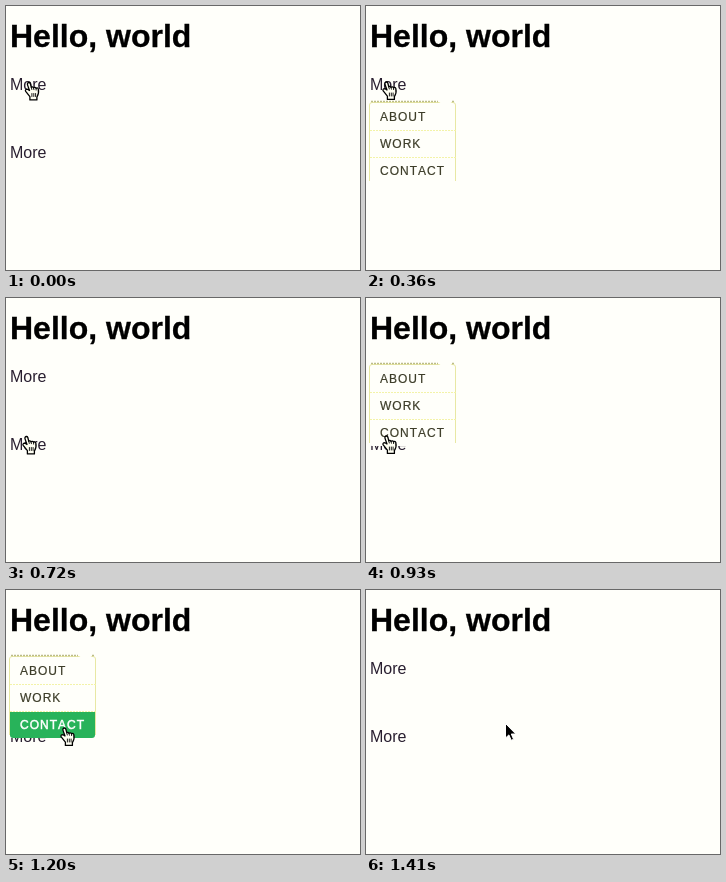
These frames come from a looping animation (354 px wide and 264 px high, 1500 ms). An HTML page:

```html
<!DOCTYPE html>
<html lang="en">
<head>
<meta charset="utf-8">
<title>Hover menu</title>
<style>
  html, body { margin: 0; width: 100%; height: 100%; overflow: hidden; background: #fffffa; }
  svg { display: block; width: 354px; height: 264px; font-family: "Liberation Sans", Arial, sans-serif; }
  .title { font-size: 32px; font-weight: bold; fill: #000; stroke: #000; stroke-width: .3px; }
  .link { font-size: 16px; fill: #291f30; }
  .panel { fill: #fffffa; }
  .side { fill: none; stroke: #e8e8a4; }
  .edge { stroke: #bcbc88; stroke-width: 1.5; stroke-dasharray: 2 1; }
  .rule { stroke: #f3f3a8; stroke-dasharray: 2 1; }
  .item path { fill: none; }
  .item text { font-size: 12px; letter-spacing: 1px; font-kerning: none; fill: #3c3c28; stroke: #3c3c28; stroke-width: .2px; }
  .item.on path { fill: #28b35a; }
  .item.on text { fill: #fff; stroke: #fff; stroke-width: .5px; }
</style>
</head>
<body>
<svg viewBox="0 0 354 264">
  <text class="title" x="4" y="41">Hello, world</text>
  <text class="link" x="4" y="84">More</text>
  <text class="link" x="4" y="152">More</text>

  <g id="menu">
    <rect class="panel" x="3" y="-1" width="87" height="82" rx="3"/>
    <path class="side" d="M3.5 78V2Q3.5 -.5 6 -.5H87Q89.5 -.5 89.5 2V78"/>
    <path class="edge" d="M5 -1.5H72M86 -1.5H89"/>
    <path d="M73 0L79.5 -4.5L86 0Z" fill="#fffffa"/>
    <path class="rule" d="M4 27.5H90M4 54.5H90"/>
  </g>

  <g id="hand" stroke="#000" stroke-width="1.3" stroke-linejoin="round" stroke-linecap="round">
    <path fill="#fffff2" d="M4.2 1C3 1.3 2.6 2.4 3.1 3.6L5 9 3.4 8C1.6 7.2 .3 8.5 1.2 9.9L5.4 15.2V18.4H12.4V15.6C14.1 13 14.5 10.5 13.8 7.4 13.4 6 12 6 11.6 7 11.4 5.8 9.6 5.4 9 6.4 8.6 5.2 7.2 5 6.8 5.8L5.8 2C5.5 1.1 4.9 .9 4.2 1Z"/>
    <path fill="none" d="M6.8 5.8L7.3 8M9 6.4L9.4 8.2M11.6 7V8.6M7.4 12V15M9.3 12V15M11.1 12V15" stroke-width=".9"/>
  </g>
  <path id="arrow" fill="#000" stroke="#fff" stroke-width="1"
        d="M.5 .5V15L3.9 11.9 6.2 17.3 8.6 16.3 6.3 11H10.8Z"/>
</svg>
<script>
const LOOP = 1500;
const LOWER = 97, UPPER = 67;

// [start ms, cursor, x, y, menu top (0 = closed), hovered item]
const steps = [
  [0, "hand", 18.5, 75.5, 0],
  [30, "hand", 18, 75.5, 0],
  [120, "hand", 17, 75, LOWER],
  [180, "hand", 16, 75, LOWER],
  [540, "hand", 16, 75.5, 0],
  [570, "hand", 16, 80, 0],
  [600, "arrow", 20, 90, 0],
  [630, "arrow", 20, 104, 0],
  [660, "arrow", 20, 120, 0],
  [690, "hand", 16, 133, 0],
  [720, "hand", 16, 137.5, 0],
  [780, "hand", 16, 137.5, UPPER],
  [930, "hand", 16, 137, UPPER],
  [960, "hand", 17, 124, UPPER, 2],
  [990, "hand", 19, 102, UPPER, 1],
  [1020, "hand", 22, 80, UPPER, 0],
  [1200, "hand", 54, 137, UPPER, 2],
  [1230, "arrow", 101, 136, UPPER],
  [1260, "arrow", 139, 133, UPPER],
  [1410, "arrow", 139, 133, 0]
];

const byId = id => document.getElementById(id);
const menu = byId("menu");
const cursors = { hand: byId("hand"), arrow: byId("arrow") };

function svg(tag, attrs, parent) {
  const node = document.createElementNS("http://www.w3.org/2000/svg", tag);
  for (const key in attrs) node.setAttribute(key, attrs[key]);
  return parent.appendChild(node);
}

const items = ["ABOUT", "WORK", "CONTACT"].map((label, i) => {
  const item = svg("g", { class: "item", transform: `translate(0 ${27 * i})` }, menu);
  const shape = i === 2 ? "M4 1H89V24Q89 27 86 27H7Q4 27 4 24Z" : "M4 1H89V27H4Z";
  svg("path", { d: shape }, item);
  svg("text", { x: 14, y: 18 }, item).textContent = label;
  return item;
});

function show(node, visible) {
  node.style.display = visible ? "" : "none";
}

function draw(time) {
  const [, cursor, x, y, top, hovered] = steps.findLast(step => step[0] <= time);
  show(menu, top);
  menu.setAttribute("transform", `translate(0 ${top})`);
  items.forEach((item, i) => item.classList.toggle("on", i === hovered));
  for (const name in cursors) show(cursors[name], name === cursor);
  cursors[cursor].setAttribute("transform", `translate(${x} ${y})`);
}

const start = performance.now();
function tick() {
  draw((performance.now() - start) % LOOP);
  requestAnimationFrame(tick);
}
tick();
</script>
</body>
</html>
```
